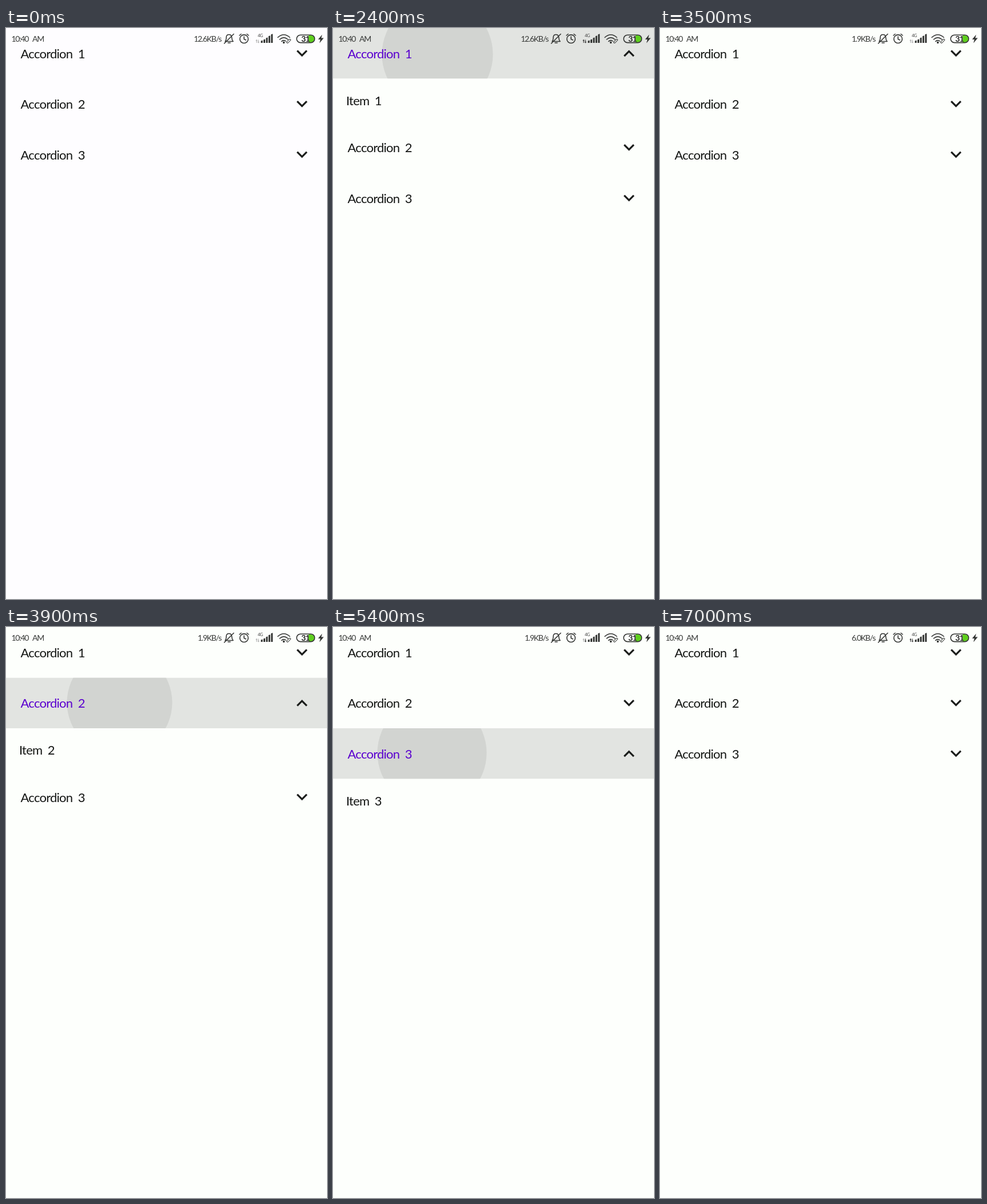
An HTML page for the animation above (7100 ms loop, 561 by 998 pixels).

```html
<!DOCTYPE html>
<html lang="en">
<head>
<meta charset="utf-8">
<title>Accordion list</title>
<style>
html, body { margin: 0; width: 100%; height: 100%; overflow: hidden; background: #fdfffc; }
svg { display: block; width: 561px; height: 998px; }
text { font-family: Lato, "Open Sans", sans-serif; }
.row { font-size: 22px; letter-spacing: -.75px; word-spacing: 4.6px; fill: #141614; stroke: currentColor; stroke-width: 0; }
.status { font-size: 14px; letter-spacing: -1.25px; word-spacing: 5px; fill: #383a38; }
.line { fill: none; stroke: #333533; stroke-width: 1.6; stroke-linecap: round; stroke-linejoin: round; }
.solid { fill: #333533; }
</style>
</head>
<body>
<svg id="stage" viewBox="0 0 561 998">
  <rect id="back" width="561" height="998"/>
  <g id="list"></g>

  <text class="status" x="9.5" y="24">10:40 AM</text>
  <text class="status" id="speed" x="376" y="24" text-anchor="end"></text>

  <g class="line">
    <path d="M383 23.5H397C394.5 21 395 19 394.5 16C394 12.5 392 11.5 389.7 11.5S385.3 12.5 385 16C384.6 19 385.4 21 383 23.5ZM388 26H392M398 10.5L381.5 27"/>
    <circle cx="416" cy="19.2" r="7.3"/>
    <path d="M416 15V19.5L419.3 21M408 13L411 10.5M424 13L421 10.5"/>
  </g>

  <text x="440" y="16" font-size="7.5" letter-spacing="-.5" fill="#444">4G</text>
  <path id="up" d="M438 26V21M436.8 22.4L438 20.8L439.2 22.4" fill="none" stroke-width="1.2"/>
  <path id="down" d="M441.3 20.5V25.5M440.1 24.2L441.3 25.8L442.5 24.2" fill="none" stroke-width="1.2"/>
  <path class="solid" d="M445.5 26V22.5L448.5 21.5V26ZM450 26V20.5L453 19.5V26ZM454.4 26V17.5L457.4 16.5V26ZM458.8 26V14.2L461.8 13.2V26ZM463.2 26V11.2L466.2 10.2V26Z"/>

  <g class="line" stroke-width="2">
    <path d="M475 16.5Q485.5 7 496 16.5M478.3 20Q485.5 13.6 492.7 20M481.6 23.3Q485.5 20 489 23"/>
    <path d="M490.5 24.5L494.8 19.8Q497 18.8 497.6 21L493 26Q490.5 26.8 490.5 24.5Z" stroke-width="1.1"/>
  </g>
  <circle class="solid" cx="485.5" cy="25.4" r="1.8"/>

  <path d="M529 13H533A5.8 5.8 0 0 1 533 25H529Z" fill="#5ed01d"/>
  <rect class="line" x="508" y="12.2" width="31.5" height="13.4" rx="6.7"/>
  <text x="523.3" y="23.7" font-size="14" font-weight="700" letter-spacing="-.8" text-anchor="middle" fill="#222">31</text>
  <path class="solid" d="M552.5 11.5L545.5 20H549.5L547.8 26.5L555.3 17.5H551Z"/>

  <circle id="ring" r="17" fill="#fff" fill-opacity=".6" stroke="#cfcce6" stroke-width="2.2"/>
</svg>

<script>
const LOOP = 7100, STEP = 100, ROW = 88.5, ITEM = 76;
const $ = id => document.getElementById(id);

function add(parent, tag, attrs, text) {
  const el = document.createElementNS('http://www.w3.org/2000/svg', tag);
  set(el, attrs);
  if (text) el.textContent = text;
  return parent.appendChild(el);
}
function set(el, attrs) {
  for (const k in attrs) el.setAttribute(k, attrs[k]);
}

// row, press time, finger x/y, ripple x/y/radius, opens?
const taps = [
  [0, 2100, 173, 58, 180, 46, 92, true],
  [0, 2900, 163, 65.5, 175, 54, 83, false],
  [1, 3700, 184, 134, 198.5, 132, 92, true],
  [1, 4400, 174, 152, 188, 146, 81, false],
  [2, 5200, 158, 224, 173, 220, 95.5, true],
  [2, 5700, 142, 224, 155, 221, 85, false]
].map(([row, at, x, y, rx, ry, r, opens]) => ({ row, at, x, y, rx, ry, r, opens }));
const lastTouch = { at: 6500, x: 456.5, y: 945.5 };

const fade = [0, 0, 1, 1, .6, .3];
const rows = [0, 1, 2].map(i => {
  const clip = add($('list'), 'clipPath', { id: 'clip' + i });
  add(clip, 'rect', { y: i * ROW, width: 561, height: ROW });
  const g = add($('list'), 'g', { 'clip-path': `url(#clip${i})` });
  return {
    shade: add(g, 'rect', { y: i * ROW, width: 561, height: ROW, 'fill-opacity': .105 }),
    ripple: add(g, 'circle', { 'fill-opacity': .07 }),
    label: add($('list'), 'text', { class: 'row', x: 25.5 }, `Accordion ${i + 1}`),
    item: add($('list'), 'text', { class: 'row', x: 23, y: ROW * (i + 1) + 134.5 - ROW }, `Item ${i + 1}`),
    arrow: add($('list'), 'path', {
      d: 'M-4.59-3.71L0 .87L4.59-3.71L6-2.3L0 3.7L-6-2.3Z', fill: '#1b1d1b'
    })
  };
});

function openRow(t) {
  let open = -1;
  for (const p of taps) if (t >= p.at + STEP) open = p.opens ? p.row : -1;
  return open;
}

function drawRows(t) {
  const open = openRow(t);
  rows.forEach((row, i) => {
    const y = i * ROW + (open >= 0 && i > open ? ITEM : 0);
    const on = i === open;
    row.label.setAttribute('y', y + 52.5);
    row.label.style.fill = on ? '#5b02cf' : '';
    row.item.style.display = on ? '' : 'none';
    row.arrow.setAttribute('transform',
      `translate(517.3 ${y + 44.4}) scale(1.58 ${on ? -1.58 : 1.58})`);

    const tap = taps.find(p => p.row === i && t >= p.at && t < p.at + 600);
    const n = tap ? (t - tap.at) / STEP : 0;
    const level = fade[n];
    row.shade.setAttribute('opacity', level);
    row.ripple.setAttribute('opacity', tap && !tap.opens && n > 3 ? 0 : level);
    if (tap) {
      const grow = tap.opens ? Math.max(0, n - 2) * 5 : 0;
      set(row.ripple, { cx: tap.rx + grow / 2, cy: tap.ry, r: tap.r + grow });
    }
  });
}

function drawRing(t) {
  const touch = [...taps, lastTouch].find(p => t >= p.at && t < p.at + 2 * STEP);
  $('ring').style.display = touch ? '' : 'none';
  if (touch) set($('ring'), { cx: touch.x, cy: touch.y, opacity: t > touch.at ? .65 : 1 });
}

function draw(t) {
  const tint = Math.min(1, Math.max(0, (t - 400) / 600));
  const mix = (a, b) => Math.round(a + (b - a) * tint);
  $('back').setAttribute('fill', `rgb(${mix(254, 253)},${mix(253, 255)},${mix(255, 252)})`);

  $('speed').textContent = t < 3300 ? '12.6KB/s' : t < 7000 ? '1.9KB/s' : '6.0KB/s';
  const idle = t < 500 || (t >= 3500 && t < 4500);
  const receiving = t >= 5000 && t < 5800;
  $('up').setAttribute('stroke', idle || receiving ? '#b5b5b5' : '#444');
  $('down').setAttribute('stroke', idle ? '#b5b5b5' : '#444');

  drawRows(t);
  drawRing(t);
}

const start = performance.now();
function tick() {
  const t = (performance.now() - start) % LOOP;
  draw(Math.floor(t / STEP) * STEP);
  requestAnimationFrame(tick);
}
tick();
</script>
</body>
</html>
```
